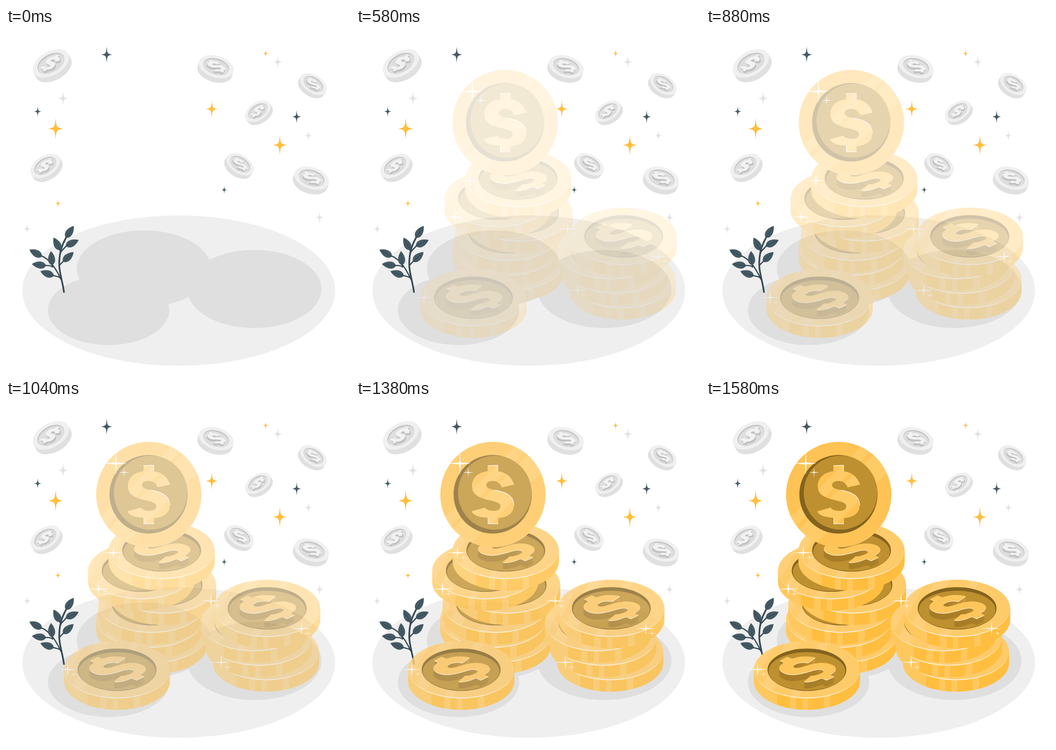
An HTML page that plays this animation: 748 px wide and 748 px high, repeating every 1620 ms.

```html
<!DOCTYPE html>
<html lang="en">
<head>
<meta charset="utf-8">
<title>Coins</title>
<style>
  html, body { margin: 0; width: 100%; height: 100%; overflow: hidden; background: #fff; }
  svg { display: block; width: 100%; height: 100%; }
</style>
</head>
<body>
<svg id="stage" viewBox="0 0 748 748"></svg>
<script>
const GOLD = { side: 'url(#side)', face: 'url(#face)', hole: '#84631f', floor: '#bf902f',
  dollar: '#fec55a', edge: 'url(#edge)', line: '#fff3dc' };
const GREY = { side: '#e0e0e0', face: '#f0f0f0', hole: '#c4c4c4', floor: '#dedede',
  dollar: '#f2f2f2', edge: '#c2c2c2', line: '#f5f5f5' };
const DARK = '#455a64', YELLOW = '#ffbe3d', PALE = '#e2e2e2';

const all = (draw, list) => list.map(args => draw(...args)).join('');

const ellipse = (x, y, rx, ry, fill) =>
  `<ellipse cx="${x}" cy="${y}" rx="${rx}" ry="${ry}" fill="${fill}"/>`;

// Hard stripes: the two colours swap at every edge
function stripes(id, attrs, colors, edges) {
  const stops = edges.map((edge, i) => [i, i + 1].map(n =>
    `<stop offset="${edge}" stop-color="${colors[n % 2]}"/>`).join('')).join('');
  return `<linearGradient id="${id}" ${attrs}>${stops}</linearGradient>`;
}

function star(x, y, r, fill) {
  const w = .12, c = (sx, sy) => `${sx * w},${sy * w} ${sx * w},${sy * w}`;
  return `<path transform="translate(${x} ${y}) scale(${r} ${r * 1.45})" fill="${fill}"
    d="M0,-1C${c(1, -1)} 1,0C${c(1, 1)} 0,1C${c(-1, 1)} -1,0C${c(-1, -1)} 0,-1Z"/>`;
}
const stars = (fill, list) => list.map(([x, y, r]) => star(x, y, r, fill)).join('');

// Thin white sparkle with a smaller one below it to the right
function glint(x, y, rx = 22, ry = 15, dx = 13, dy = 10.5) {
  const ray = (px, py, k) => `<path fill="#fff" transform="translate(${px} ${py})
    scale(${rx * k} ${ry * k})" d="M0,-1L.06,-.09L1,0L.06,.09L0,1L-.06,.09L-1,0L-.06,-.09Z"/>`;
  return ray(x, y, 1) + ray(x + dx, y + dy, .46);
}

// Tilted coin around the centre of its face
function coin(colors, x, y, r, flat, depth, tilt = 0, hasDollar = true) {
  const ry = r * flat, inner = r * .742, innerY = inner * flat, drop = r * .028;
  const turn = tilt < 0 ? 56 : -46;
  const dollar = (dy, fill) => `<use href="#dollar" fill="${fill}" transform="translate(0 ${dy})
    scale(1 ${flat * .82}) rotate(${turn}) scale(${r / 104}) translate(-288.5 -205.5)"/>`;
  let out = `<g transform="translate(${x} ${y}) rotate(${tilt})">
    <path fill="${colors.side}" d="M${-r},0V${depth}A${r},${ry} 0 0 0 ${r},${depth}V0Z"/>` +
    ellipse(0, 0, r, ry, colors.face) +
    `<path fill="${colors.line}" d="M${-r},0A${r},${ry} 0 0 0 ${r},0A${r},${ry - r * .015} 0 0 1 ${-r},0Z"/>` +
    ellipse(0, 0, inner, innerY, colors.hole) +
    ellipse(0, drop, inner - r * .02, innerY - drop - r * .012, colors.floor);
  if (hasDollar) {
    const top = -r * .026, height = r * .125, step = r * .0125;
    for (let dy = height; dy > step; dy -= step) out += dollar(top + dy, colors.edge);
    out += dollar(top + r * .01, colors.line) + dollar(top, colors.dollar);
  }
  return out + '</g>';
}

const goldCoin = (x, y, hasDollar = true) => coin(GOLD, x, y, 115.5, .538, 25, 0, hasDollar);

// Plain coins piled upwards at an even rise
const stack = (bottom, rise, xs) =>
  xs.map((x, i) => goldCoin(x, bottom - i * rise, false)).join('');

// Small coin placed by the middle of its whole shape
function greyCoin(x, y, r, tilt) {
  const depth = r * .28, a = tilt * Math.PI / 180;
  return coin(GREY, x + Math.sin(a) * depth / 2, y - Math.cos(a) * depth / 2, r, .6, depth, tilt);
}

const leaf = (x, y, angle) => `<g transform="translate(${x} ${y}) rotate(${angle}) scale(31)">
  <path fill="${DARK}" d="M0,0C.15,-.34 .6,-.32 1,0C.6,.32 .15,.34 0,0Z"/>
  <path fill="none" stroke="#30444e" stroke-width=".03" d="M0,0H.85"/></g>`;

const defs = `<defs>
  <path id="dollar" d="M277,143L299,142V155C316,157 328,165 335,184L308,190C304,181 298,176 288,176
    C279,176 274,180 274,185C274,191 280,193 293,196C321,201 334,210 334,229C334,246 321,255 300,257
    V269H278V256C259,255 247,252 242,242L271,234C275,239 281,241 291,241C300,241 305,237 305,231
    C305,225 298,222 286,219C258,213 243,206 243,187C243,169 257,157 277,155Z"/>` +
  stripes('side', '', ['#ffc85e', '#ffbe3f'], [.22, .34, .4, .46, .51, .66, .72]) +
  stripes('face', 'x2="1" y2=".3"', ['#ffd079', '#fecb6a'], [.2, .28, .4, .58, .66]) +
  stripes('shine', 'gradientUnits="userSpaceOnUse" x1="207.5" y1="124" x2="369.5" y2="286"',
    ['#fec354', '#ffcb66'], [.33, .43, .47, .68]) +
  `<linearGradient id="edge"><stop stop-color="#a67b25"/><stop offset=".55" stop-color="#ab8028"/>
    <stop offset="1" stop-color="#d39c35"/></linearGradient></defs>`;

const ground = ellipse(375.5, 571, 340, 163.5, '#efefef') + ellipse(300, 523, 146, 83, '#dfdfdf') +
  ellipse(540, 567.5, 146, 85, '#dfdfdf') + ellipse(223, 613.5, 132, 76, '#dfdfdf');

const plant = `<g fill="none" stroke="#344952" stroke-linecap="round">
    <path stroke-width="3.6" d="M126,574C123,550 114,528 116,506C117,485 122,472 131,455"/>
    <path stroke-width="2.6" d="M119,546C109,523 96,503 76,495M118,488L132,473M116,516L125,507
      M101,520L100,512M101,519C96,516 91,517 85,516M118,543C113,540 109,540 102,538M119,489L117,481"/>
  </g>` + all(leaf, [
  [130, 456, -56], [118, 483, -118], [130, 474, -25], [124, 508, -42],
  [100, 516, -94], [78, 497, -151], [87, 517, -173], [104, 539, -161]
]);

const sky =
  stars(DARK, [[219, 58, 12], [69, 181.5, 8], [632, 193, 10], [474.5, 352, 6]]) +
  stars(YELLOW, [[108, 219, 16], [113, 381.5, 6], [447.5, 176, 13], [564.5, 55.5, 6], [595.5, 254.5, 15]]) +
  stars(PALE, [[124, 153, 11], [591, 74, 10], [46, 437, 8], [657.5, 234, 8], [682, 412, 9]]) +
  all(greyCoin, [
    [100.5, 82, 43, -30], [455.5, 89, 39, 17], [666, 125.5, 32, 33], [550, 184.5, 31, -33],
    [506.5, 300, 33, 33], [663, 331.5, 39, 18], [88, 304, 36, -33]
  ]);

const standingCoin = ellipse(289, 205.5, 114.5, 114.5, '#fff3dc') +
  ellipse(288.5, 205.5, 114.5, 114.5, 'url(#shine)') +
  ellipse(288, 205, 85, 85.5, GOLD.hole) + ellipse(292.5, 201.5, 80, 80.5, GOLD.floor) +
  `<use href="#dollar" fill="url(#shine)"/>
  <path fill="none" stroke="#fff6e6" stroke-width="1.4" d="M277,143L299,142V155M278,256V269H300
    M293,196C321,201 334,210 334,229"/>`;

const pile =
  stack(509, 32.5, [300, 289.5, 294.5]) + stack(402, 31, [319.5, 272]) + goldCoin(316.5, 327) +
  standingCoin +
  stack(547, 31.5, [543.5, 528.5, 517]) + goldCoin(546, 453) +
  goldCoin(219.5, 586.5) +
  glint(217, 138, 24, 26, 18, 19.5) +
  all(glint, [[211.5, 332], [179, 411], [424, 437], [621, 497], [446, 570.5], [112, 586]]);

const stage = document.getElementById('stage');
stage.innerHTML = defs + ground + plant + sky + `<g id="pile">${pile}</g>`;
const pileGroup = document.getElementById('pile');

// Same curve as CSS ease-in: cubic-bezier(.42, 0, 1, 1)
function easeIn(x) {
  let low = 0, high = 1, s;
  for (let i = 0; i < 24; i++) {
    s = (low + high) / 2;
    const at = 1.26 * s * (1 - s) ** 2 + 3 * s * s * (1 - s) + s ** 3;
    if (at < x) low = s; else high = s;
  }
  return s * s * (3 - 2 * s);
}

const LOOP = 1620, STEPS = 39, SHIFT = 44.9;
const start = performance.now();

// The pile fades in while sliding left, at 24 steps a second
function draw(now) {
  const time = Math.max(0, now - start) % LOOP;
  const step = Math.floor((time + 5) * 24 / 1000);
  const progress = step < 4 ? 0 : easeIn((step + 1) / STEPS);
  pileGroup.setAttribute('opacity', progress);
  pileGroup.setAttribute('transform', `translate(${SHIFT * (1 - progress)} 0)`);
  requestAnimationFrame(draw);
}
draw(start);
</script>
</body>
</html>
```
